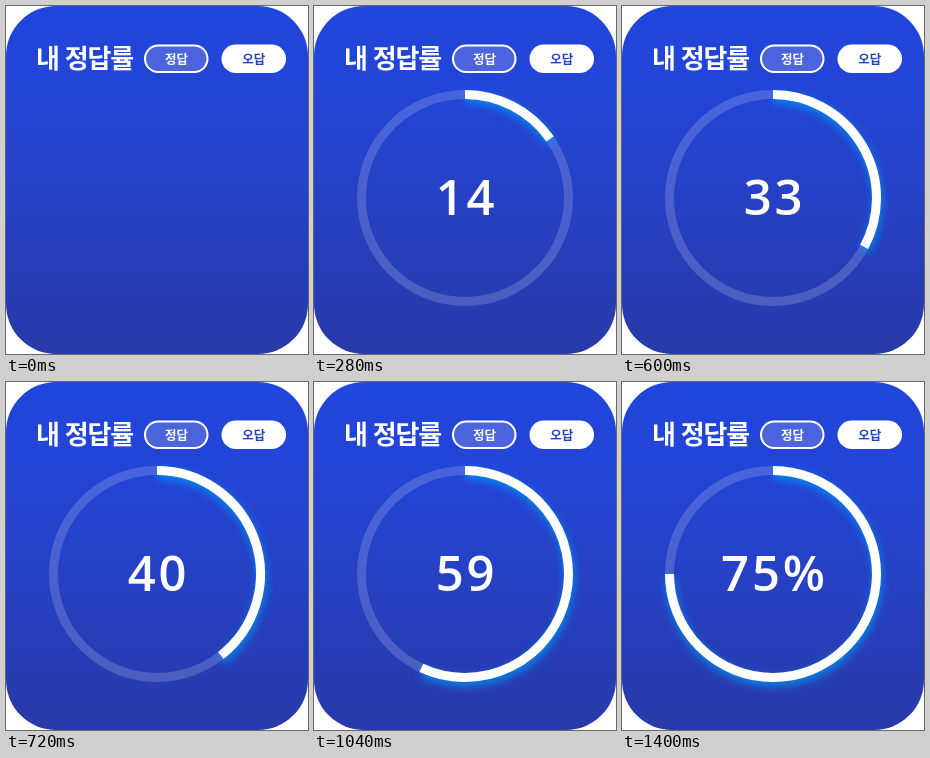
These frames come from a looping animation (302x348 px, 1.44 s). An HTML page:

```html
<!DOCTYPE html>
<html lang="ko">
<head>
<meta charset="utf-8">
<title>내 정답률</title>
<style>
  html, body { margin: 0; width: 100%; height: 100%; overflow: hidden; background: #fff; }
  svg { display: block; width: 302px; height: 348px; }
  text { fill: #fff; font-family: "Noto Sans CJK KR", "Noto Sans CJK", sans-serif; font-weight: 700; }
  .title { font-size: 26px; letter-spacing: -1.2px; }
  .label { font-size: 12.5px; text-anchor: middle; }
  .count { font: 600 49px "Open Sans", "Noto Sans", sans-serif; letter-spacing: 2.8px; text-anchor: middle; }
  .ring { fill: none; stroke: #fff; stroke-width: 9; }
  .glow { filter: drop-shadow(1px 4px 4px rgba(0, 150, 245, .85)); }
</style>
</head>
<body>
<svg viewBox="0 0 302 348">
  <defs>
    <linearGradient id="bg" x2="0" y2="1">
      <stop offset="0" stop-color="#2146dc"/>
      <stop offset=".25" stop-color="#2345d6"/>
      <stop offset="1" stop-color="#293aa9"/>
    </linearGradient>
  </defs>
  <rect width="302" height="348" rx="50" fill="url(#bg)"/>

  <text class="title" x="30" y="62">내 정답률</text>
  <rect x="139" y="39.5" width="62.5" height="26.5" rx="13.25" fill="#4c65de" stroke="#fff" stroke-width="2"/>
  <text class="label" x="170.5" y="58">정답</text>
  <rect x="215.5" y="38.5" width="64.5" height="28.5" rx="14.25" fill="#fff"/>
  <text class="label" x="247.7" y="58" style="fill:#2443c4">오답</text>

  <g id="dial">
    <circle class="ring" cx="151" cy="192" r="103.5" stroke-opacity=".17"/>
    <g class="glow"><path class="ring" id="arc"/></g>
  </g>
  <text class="count" id="count" x="152.4" y="208.5"></text>
</svg>
<script>
  const LOOP = 1440, STEP = 40;
  const FADE = 220, SWEEP = 1370, COUNT_START = 40, COUNT_TIME = 1280;
  const GOAL = 75, CX = 151, CY = 192, R = 103.5;
  const [dial, arc, count] = ['dial', 'arc', 'count'].map(id => document.getElementById(id));
  const clamp = v => Math.max(0, Math.min(1, v));

  function arcPath(turn) {
    const a = turn * 2 * Math.PI;
    const x = CX + R * Math.sin(a), y = CY - R * Math.cos(a);
    return `M${CX} ${CY - R}A${R} ${R} 0 ${turn > .5 ? 1 : 0} 1 ${x} ${y}`;
  }

  function draw(ms) {
    const t = Math.floor((ms % LOOP) / STEP) * STEP;
    const n = Math.round(GOAL * clamp((t - COUNT_START) / COUNT_TIME));
    dial.setAttribute('opacity', clamp(t / FADE));
    arc.setAttribute('d', arcPath(GOAL / 100 * clamp(t / SWEEP)));
    count.textContent = t < COUNT_START ? '' : n < GOAL ? n : n + '%';
  }

  const start = performance.now();
  function tick(now) {
    draw(Math.max(0, now - start));
    requestAnimationFrame(tick);
  }
  tick(start);
</script>
</body>
</html>
```
